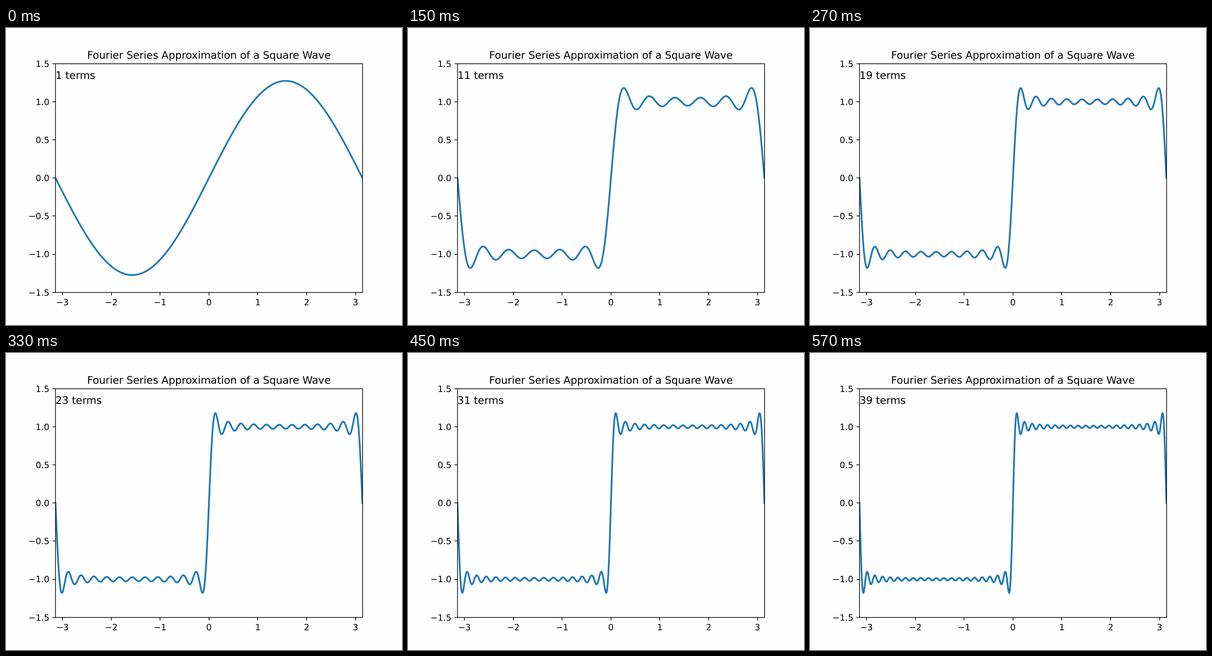
Recreate the animation shown at these times as an HTML page. Size 864x648 px, loop 0.6 s.

```html
<!DOCTYPE html>
<html lang="en">
<head>
<meta charset="utf-8">
<title>Fourier series</title>
<style>
  html, body { margin: 0; width: 100%; height: 100%; overflow: hidden; background: #fefefe; }
  svg { display: block; width: 864px; height: 648px; }
  text { font: 18.75px "DejaVu Sans", sans-serif; fill: #000; text-rendering: geometricPrecision; white-space: pre; }
  .large { font-size: 22.5px; }
  .mid { text-anchor: middle; }
  .end { text-anchor: end; }
  #axes { fill: none; stroke: #000; stroke-width: 1.5; }
  #curve { fill: none; stroke: #1f77b4; stroke-width: 3.75; stroke-linejoin: round; stroke-linecap: square; }
</style>
</head>
<body>
<svg viewBox="0 0 864 648">
  <clipPath id="plot"><rect x="108" y="78" width="670" height="499"/></clipPath>
  <g clip-path="url(#plot)"><path id="curve"/></g>
  <path id="axes"/>
  <g id="labels"></g>
  <text class="large mid" x="442.8" y="67">Fourier Series Approximation of a Square Wave</text>
  <text class="large" id="terms" x="108" y="111"></text>
</svg>
<script>
const STEP_MS = 30, STEPS = 20, SAMPLES = 1000;
const $ = id => document.getElementById(id);
const toX = x => 442.8 + x * 334.8 / Math.PI;
const toY = y => 327.24 - y * 166.32;

function addLabel(text, x, y, cls) {
  const el = document.createElementNS("http://www.w3.org/2000/svg", "text");
  el.setAttribute("x", x);
  el.setAttribute("y", y);
  el.setAttribute("class", cls);
  el.textContent = text.replace("-", "\u2212");
  $("labels").append(el);
}

function drawAxes() {
  let d = "M108 78H778V577H108Z";
  for (let i = -3; i <= 3; i++) {
    const x = toX(i), y = toY(i / 2);
    d += `M${Math.round(x)} 577v6.56M108 ${Math.round(y)}h-6.56`;
    addLabel(String(i), x, 605, "mid");
    addLabel((i / 2).toFixed(1), 94.6, Math.round(y + 6.8), "end");
  }
  $("axes").setAttribute("d", d);
}

// Partial sum of the square wave's odd harmonics up to n
function wave(x, n) {
  let sum = 0;
  for (let k = 1; k <= n; k += 2) sum += Math.sin(k * x) / k;
  return 4 / Math.PI * sum;
}

function curvePath(n) {
  const points = Array.from({ length: SAMPLES }, (_, i) => {
    const x = Math.PI * (2 * i / (SAMPLES - 1) - 1);
    return toX(x).toFixed(2) + " " + toY(wave(x, n)).toFixed(2);
  });
  return "M" + points.join("L");
}

const paths = Array.from({ length: STEPS }, (_, i) => curvePath(2 * i + 1));
let shown = -1;

function render() {
  const step = Math.floor(performance.now() / STEP_MS) % STEPS;
  if (step !== shown) {
    shown = step;
    $("curve").setAttribute("d", paths[step]);
    $("terms").textContent = `${2 * step + 1} terms`;
  }
  requestAnimationFrame(render);
}

drawAxes();
render();
</script>
</body>
</html>
```
